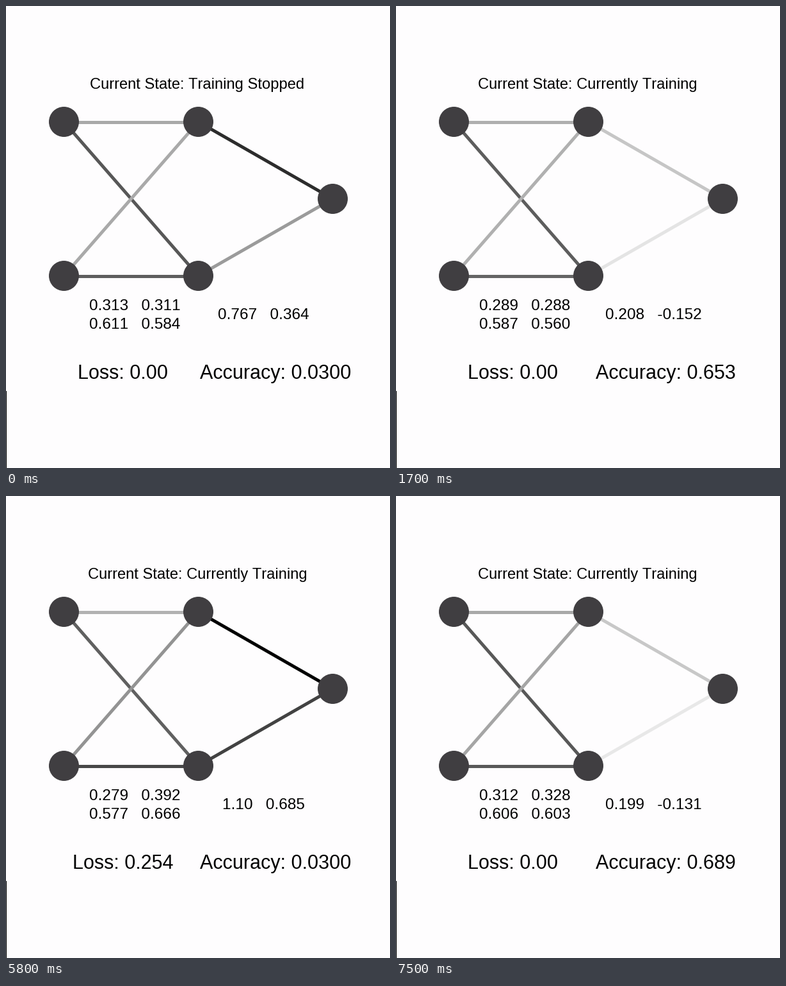
A matplotlib script for the animation above (8 s loop, 600x720 px).

```python
import matplotlib as mpl
import matplotlib.pyplot as plt
import numpy as np
from matplotlib.animation import FuncAnimation
from matplotlib.patches import Circle, Rectangle

W, H, DPI = 600, 720, 72
INTERVAL, FRAMES = 100, 80
mpl.rcParams.update({
    "font.family": "Liberation Sans",
    "text.kerning_factor": 6,
})

BACK, NODE = "#fefdfe", "#403e41"
LAYERS = [[(90, 180), (90, 420)], [(300, 180), (300, 420)], [(510, 300)]]
DECAY = .41


class Run:
    """A fast fit up to the settled step, then slow fine tuning."""

    def __init__(self, bursts, settled, weights, accuracy, loss):
        self.ticks = [t + i for t, count in bursts for i in range(count)]
        self.settled = settled
        self.weights = np.array(weights)
        self.accuracy = accuracy
        self.loss = loss

    def phase(self, k):
        """Index of the current phase and its progress from 0 to 1."""
        n = self.settled
        if k <= n:
            return 0, k / n
        return 1, (k - n) / (len(self.ticks) - 1 - n)

    def state(self, tick):
        k = max(sum(t <= tick for t in self.ticks) - 1, 0)
        i, x = self.phase(k)

        end = DECAY ** self.settled
        mix = x if i else (1 - DECAY ** k) / (1 - end)
        w = self.weights[i] + (self.weights[i + 1] - self.weights[i]) * mix

        err0, err1 = 1 - self.accuracy[i], 1 - self.accuracy[i + 1]
        acc = 1 - err0 * (err1 / err0) ** x ** 1.5

        # The loss falls with the squared weight error, and is idle at zero.
        fall = min(k, self.settled + .5)
        loss = self.loss * DECAY ** (2 * fall) if tick in self.ticks else 0
        return w, loss, acc


# Weights at the first, the settled and the last step.
RUNS = [
    Run(bursts=[(5, 7), (16, 1), (20, 3), (28, 1), (31, 1), (35, 1)],
        settled=5,
        weights=[(.313, .311, .611, .584, .767, .364),
                 (.289, .288, .587, .560, .210, -.151),
                 (.290, .289, .588, .561, .203, -.157)],
        accuracy=(.03, .559, .935), loss=.1006),
    Run(bursts=[(58, 8), (67, 2), (74, 1)],
        settled=6,
        weights=[(.279, .392, .577, .666, 1.10, .685),
                 (.312, .328, .606, .603, .203, -.128),
                 (.312, .328, .606, .603, .199, -.131)],
        accuracy=(.03, .198, .689), loss=.254),
]


def gray(w):
    level = 1 - 1.08 * w if w >= 0 else 1 + .7 * w
    return str(float(np.clip(level, 0, 1)))


def sig(v):
    return f"{v:#.3g}"


def label(x, y, size):
    return ax.text(x, y, "", size=size, color="black", ha="center",
                   va="baseline", zorder=20)


fig = plt.figure(figsize=(W / DPI, H / DPI), dpi=DPI, facecolor=BACK)
ax = fig.add_axes([0, 0, 1, 1])
ax.set_xlim(0, W)
ax.set_ylim(H, 0)
ax.axis("off")

# Lines run in weight order: for each target node, one per source node.
lines = []
for sources, targets in zip(LAYERS, LAYERS[1:]):
    for i, a in enumerate(sources):
        for j, b in enumerate(targets):
            (x0, y0), (x1, y1) = a, b
            line, = ax.plot([x0 + .5, x1 + .5], [y0 + .5, y1 + .5], lw=5,
                            solid_capstyle="butt", zorder=1 + i)
            lines.append((line, len(sources) * 2 * (sources is LAYERS[1])
                          + i + 2 * j if sources is LAYERS[1]
                          else i + 2 * j))
for layer in LAYERS:
    for x, y in layer:
        ax.add_patch(Circle((x + .5, y + .5), 23.5, fc=NODE, lw=0, zorder=10))
ax.add_patch(Rectangle((0, 600), 1, 120, fc="black", lw=0))

title = label(299, 129, 23.8)
loss_text = label(183, 581, 30.5)
acc_text = label(421.5, 581, 30.5)
pairs = [label(x, y, 24.4) for x, y in [(201.5, 474), (201.5, 503), (402, 488)]]


def update(tick):
    run = RUNS[tick >= RUNS[1].ticks[0]]
    w, loss, acc = run.state(tick)
    for line, i in lines:
        line.set_color(gray(w[i]))
    for text, pair in zip(pairs, w.reshape(3, 2)):
        text.set_text("   ".join(map(sig, pair)))
    running = tick >= RUNS[0].ticks[0]
    mode = "Currently Training" if running else "Training Stopped"
    title.set_text(f"Current State: {mode}")
    loss_text.set_text(f"Loss: {sig(loss)}")
    acc_text.set_text(f"Accuracy: {sig(acc)}")
    return []


anim = FuncAnimation(fig, update, frames=FRAMES, interval=INTERVAL,
                     init_func=lambda: update(0), repeat=True, repeat_delay=0)
plt.show()
```
